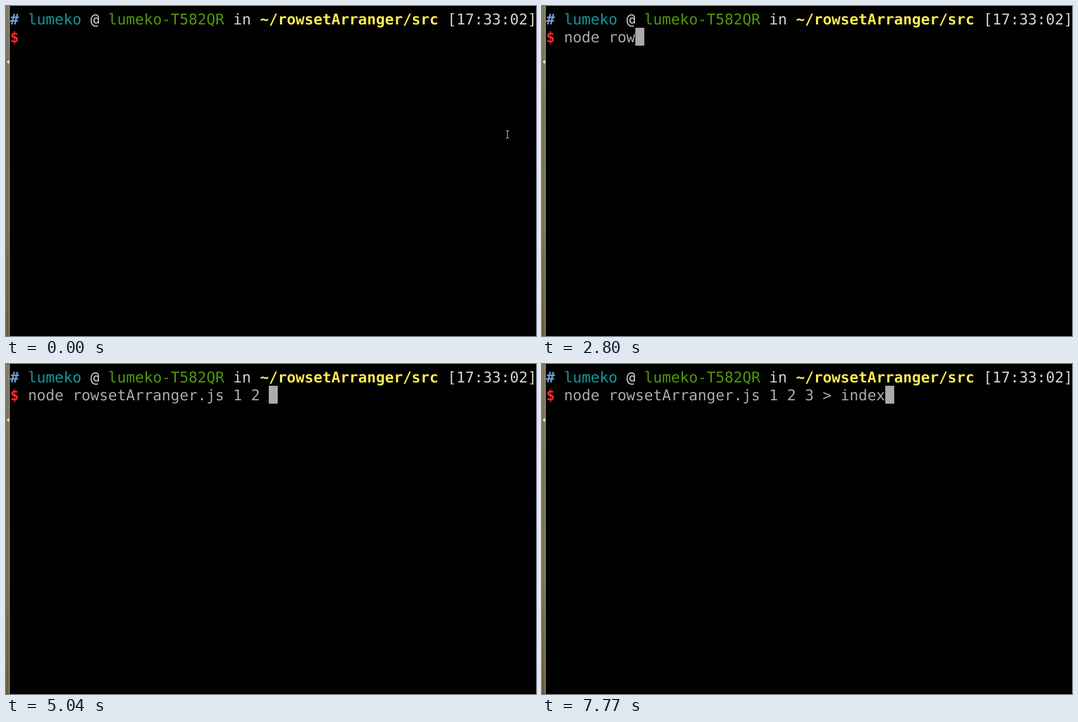
Recreate the animation shown at these times as an HTML page. Size 948x591 px, loop 8000 ms.

```html
<!DOCTYPE html>
<html lang="en">
<head>
<meta charset="utf-8">
<title>Terminal</title>
<style>
  html, body { margin: 0; width: 100%; height: 100%; overflow: hidden; background: #000; }
  svg { display: block; width: 948px; height: 591px; }
  text {
    font: 26.52px "DejaVu Sans Mono", monospace;
    text-rendering: geometricPrecision;
    white-space: pre;
  }
  .bold { font-weight: bold; }
</style>
</head>
<body>
<svg viewBox="0 0 948 591">
  <defs>
    <linearGradient id="wall" x1="0" y1="0" x2="0" y2="1">
      <stop offset="0" stop-color="#837b62"/>
      <stop offset=".3" stop-color="#77704f"/>
      <stop offset=".65" stop-color="#7b7352"/>
      <stop offset="1" stop-color="#6a5d3a"/>
    </linearGradient>
  </defs>
  <rect width="948" height="591"/>
  <rect width="6" height="591" fill="url(#wall)"/>
  <rect x="5.5" width="1.2" height="591" fill="#aaa592"/>
  <path d="M1 100 L5.5 96.5 V103.5 Z" fill="#f0f0ec"/>
  <g id="prompt"></g>
  <rect id="cursor" y="39" height="32" fill="#aaa"/>
  <text id="command" y="64.5" fill="#aaa"></text>
  <path id="pointer" d="M894 223.5 H896 L897 224.5 L898 223.5 H900 M897 224.5 V235.5 M894 236.5 H896 L897 235.5 L898 236.5 H900"
        fill="none" stroke="#c8c8c8" stroke-width="1.2"/>
</svg>
<script>
const LOOP = 8000, LEFT = 7.2, CELL = 15.966;
const FIRST_COLUMN = 2, FIRST_KEY = 1260;
const COMMAND = "node rowsetArranger.js 1 2 3 > index";

// Each entry: time in ms, number of visible characters.
const KEYS = [
  [0, 0], [1260, 1], [1400, 2], [1540, 3], [1820, 4], [2030, 5],
  [2380, 6], [2520, 7], [2800, 8], [2940, 9], [3220, 23],
  [4060, 24], [4480, 25], [4690, 26], [5040, 27], [5390, 28],
  [5880, 29], [6510, 30], [6790, 31], [6930, 32], [7140, 33],
  [7280, 34], [7420, 35], [7770, 36]
];
const CURSOR_OFF = [[0, 350], [980, 1260], [3850, 4060]];

const byId = id => document.getElementById(id);
const columnX = column => LEFT + column * CELL;
const command = byId("command"), cursor = byId("cursor"), pointer = byId("pointer");

function addRun(column, y, fill, content, bold) {
  const run = document.createElementNS("http://www.w3.org/2000/svg", "text");
  run.setAttribute("x", columnX(column));
  run.setAttribute("y", y);
  run.setAttribute("fill", fill);
  if (bold) run.setAttribute("class", "bold");
  run.textContent = content;
  byId("prompt").append(run);
}

addRun(0, 32.5, "#729fcf", "#", true);
addRun(2, 32.5, "#129799", "lumeko");
addRun(9, 32.5, "#d3d7cf", "@");
addRun(11, 32.5, "#4e9a06", "lumeko-T582QR");
addRun(25, 32.5, "#d3d7cf", "in");
addRun(28, 32.5, "#fce94f", "~/rowsetArranger/src", true);
addRun(49, 32.5, "#d3d7cf", "[17:33:02]");
addRun(0, 64.5, "#ef2929", "$", true);
command.setAttribute("x", columnX(FIRST_COLUMN));

function render(time) {
  const typed = KEYS.findLast(([start]) => start <= time)[1];
  const hidden = CURSOR_OFF.some(([from, to]) => time >= from && time < to);
  const column = FIRST_COLUMN + typed;
  const left = Math.round(columnX(column));
  command.textContent = COMMAND.slice(0, typed);
  cursor.setAttribute("x", left);
  cursor.setAttribute("width", Math.round(columnX(column + 1)) - left);
  cursor.setAttribute("visibility", hidden ? "hidden" : "visible");
  pointer.setAttribute("visibility", time < FIRST_KEY ? "visible" : "hidden");
}

const began = performance.now();
function tick() {
  render((performance.now() - began) % LOOP);
  requestAnimationFrame(tick);
}
tick();
</script>
</body>
</html>
```
